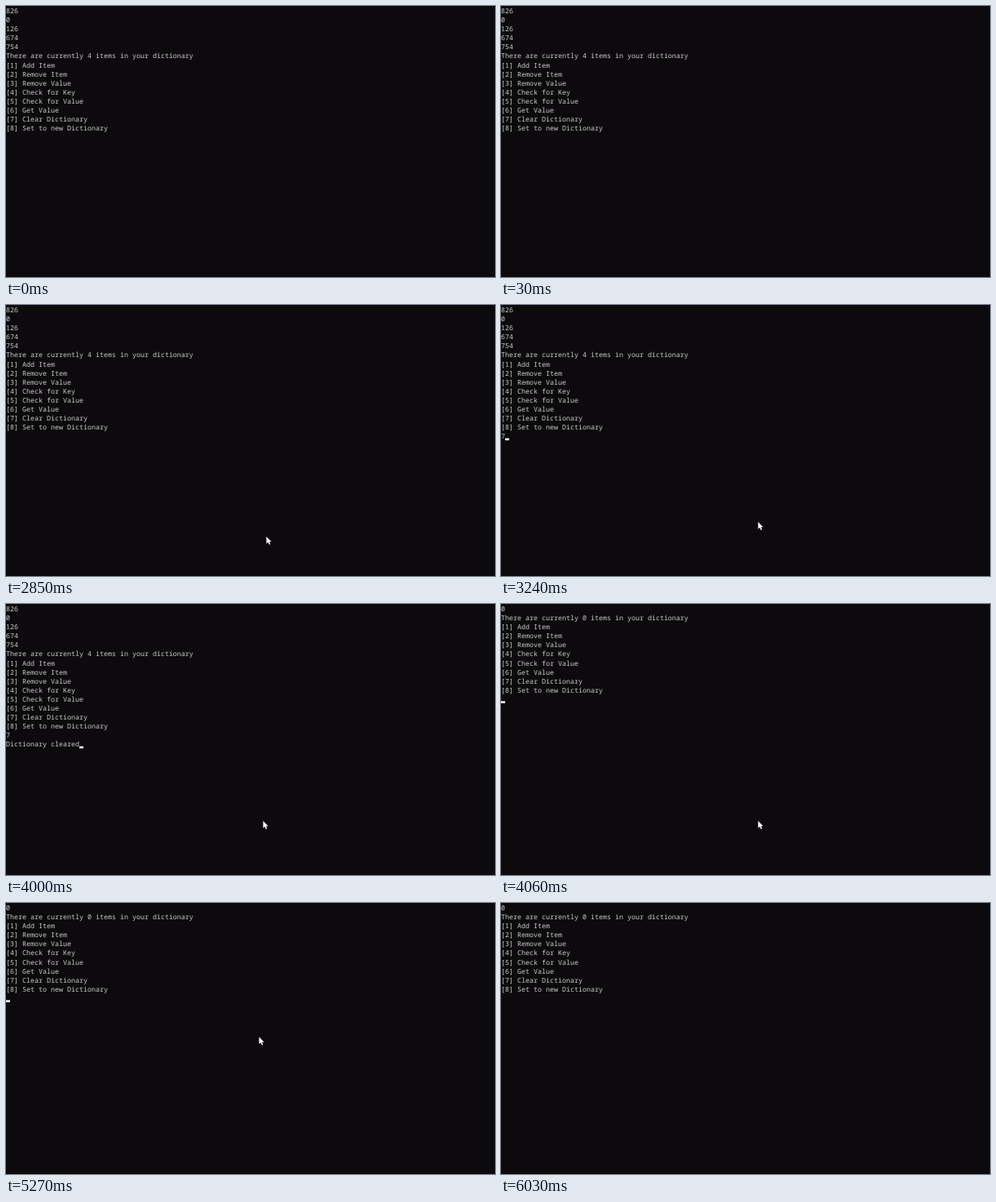
These frames come from a looping animation (600x333 px, 6.36 s). An HTML page with a canvas:

```html
<!DOCTYPE html>
<html lang="en">
<head>
<meta charset="utf-8">
<title>Dictionary console</title>
<style>
  html, body { margin: 0; height: 100%; overflow: hidden; background: #0c0a0c; }
  canvas { display: block; }
</style>
</head>
<body>
<canvas id="stage" width="600" height="333"></canvas>
<script>
const LOOP = 6360, ROW = 11.1, CHAR = 5;
const TYPED = 3150, CLEARED = 4000, RESET = 4060;
const ctx = document.getElementById('stage').getContext('2d');
const arrow = new Path2D('M0 0V8.8L2 7L3.5 10.2L4.9 9.6L3.5 6.5H6.2Z');

const menu = ['Add Item', 'Remove Item', 'Remove Value', 'Check for Key', 'Check for Value',
  'Get Value', 'Clear Dictionary', 'Set to new Dictionary'].map((label, i) => `[${i + 1}] ${label}`);
const screen = values => [...values,
  `There are currently ${values.length - 1} items in your dictionary`, ...menu];
const before = screen([826, 0, 126, 674, 754]);
const after = screen([0]);

// Caret: [on, off, column, row]
const caret = [
  [2060, 2610, 0, 14], [3120, TYPED, 0, 14], [TYPED, 3640, 1, 14],
  [CLEARED, RESET, 18, 15], [RESET, 4730, 0, 10], [5250, 5760, 0, 10]
];

// Pointer tip: [time, x, y]
const pointer = [
  [2610, 313, 334], [2850, 319.5, 284.5], [3240, 315.5, 266.5],
  [5030, 315.5, 266.5], [5270, 310.5, 164.5], [5520, 560, 196]
];

function linesAt(t) {
  if (t >= RESET) return after;
  const lines = [...before];
  if (t >= TYPED) lines.push('7');
  if (t >= CLEARED) lines.push('Dictionary cleared');
  return lines;
}

function drawPointer(t) {
  const i = pointer.findIndex(([end]) => t < end);
  if (i < 1) return;
  const [t0, x0, y0] = pointer[i - 1], [t1, x1, y1] = pointer[i];
  const u = (t - t0) / (t1 - t0);
  const k = i === 5 ? u * u : u * (2 - u);
  ctx.save();
  ctx.translate(x0 + (x1 - x0) * k, y0 + (y1 - y0) * k);
  ctx.fillStyle = '#fff';
  ctx.fill(arrow);
  ctx.restore();
}

function draw() {
  const t = performance.now() % LOOP;
  ctx.fillStyle = '#0c0a0c';
  ctx.fillRect(0, 0, 600, 333);

  ctx.font = '8.333px "Noto Sans Mono", "DejaVu Sans Mono", monospace';
  ctx.textRendering = 'geometricPrecision';
  ctx.fillStyle = '#ccc';
  linesAt(t).forEach((line, i) => ctx.fillText(line, 0, 8.9 + i * ROW));

  ctx.fillStyle = '#f2f2f2';
  for (const [on, off, col, row] of caret) {
    if (t >= on && t < off) ctx.fillRect(col * CHAR, row * ROW + 8.3, CHAR, 2.6);
  }
  drawPointer(t);
  requestAnimationFrame(draw);
}
draw();
</script>
</body>
</html>
```
